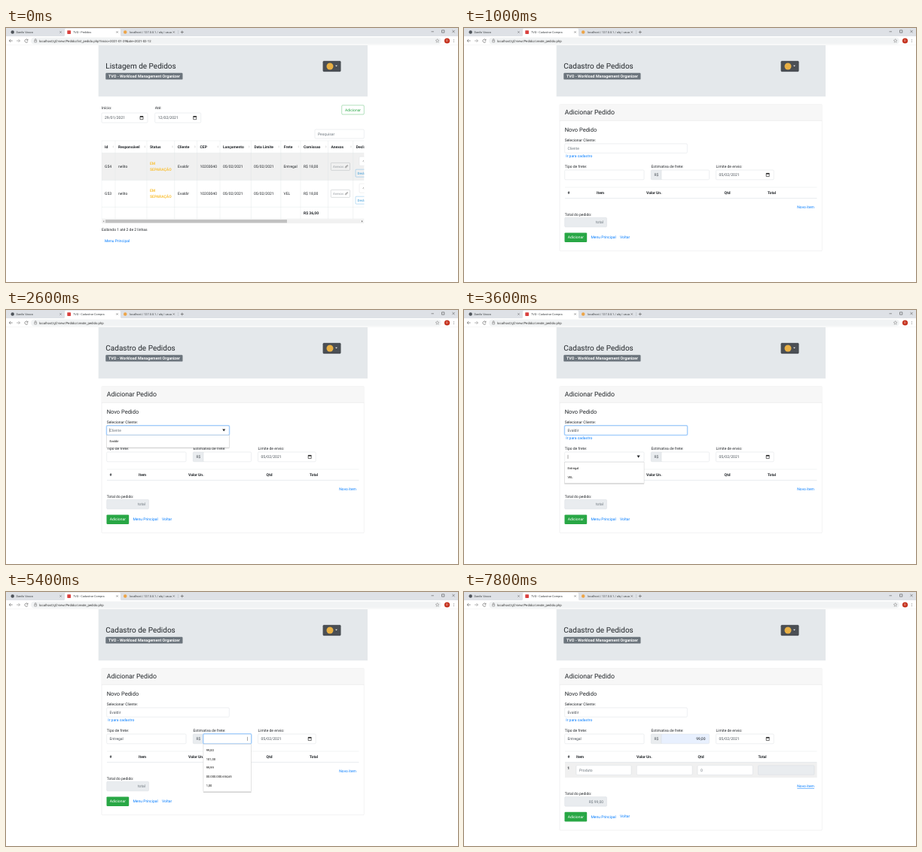
An HTML page that plays this animation: 600 px wide and 338 px high, repeating every 8 s.

```html
<!DOCTYPE html>
<html lang="pt-BR">
<head>
<meta charset="utf-8">
<title>Pedidos</title>
<style>
  html, body { margin: 0; width: 100%; height: 100%; overflow: hidden; background: #fff; }
  svg { display: block; width: 100%; height: 100%; font-family: Roboto, sans-serif; text-rendering: geometricPrecision; }
</style>
</head>
<body>
<svg id="stage" viewBox="0 0 600 338">
  <defs>
    <clipPath id="tableClip"><rect x="126.5" y="149" width="349" height="112"/></clipPath>
    <filter id="shadow" x="-10%" y="-10%" width="120%" height="130%">
      <feDropShadow dx="0" dy=".6" stdDeviation=".7" flood-opacity=".35"/>
    </filter>
  </defs>
  <g id="view"></g>
</svg>
<script>
const LOOP = 8000;
const INK = '#212529', GREY = '#6c757d', BLUE = '#007bff', GREEN = '#28a745', LINE = '#dee2e6', FIELD = '#ced4da', OFF = '#e9ecef';
const CUSTOMER = 'Evaldir', CARRIER = 'Entregal';

// y is the vertical middle of the text
const text = (x, y, label, { size = 5, fill = INK, weight = 400, anchor = 'start', extra = '' } = {}) =>
  `<text x="${x}" y="${y + size * .355}" font-size="${size}" fill="${fill}" font-weight="${weight}" text-anchor="${anchor}" ${extra}>${label}</text>`;
const bold = (x, y, label) => text(x, y, label, { weight: 700 });
const link = (x, y, label, options = {}) => text(x, y, label, { fill: BLUE, ...options });
const box = (x1, y1, x2, y2, fill, stroke = 'none', radius = 0, extra = '') =>
  `<rect x="${x1}" y="${y1}" width="${x2 - x1}" height="${y2 - y1}" rx="${radius}" fill="${fill}" stroke="${stroke}" stroke-width=".35" ${extra}/>`;
const path = (d, stroke, width = .4, fill = 'none') =>
  `<path d="${d}" stroke="${stroke}" stroke-width="${width}" fill="${fill}"/>`;
const circle = (x, y, r, fill) => `<circle cx="${x}" cy="${y}" r="${r}" fill="${fill}"/>`;
const arrow = (x, y, w, h, fill = INK) => path(`M${x - w} ${y - h}h${2 * w}l${-w} ${2 * h}z`, 'none', 0, fill);
const cross = (x, y, r) => path(`M${x - r} ${y - r}l${2 * r} ${2 * r}m0 ${-2 * r}l${-2 * r} ${2 * r}`, '#444', .5);

const input = (x1, y1, x2, y2, { fill = '#fff', focus = 0 } = {}) =>
  box(x1, y1, x2, y2, fill, FIELD, 1.2) + (focus > 0 ? `<g opacity="${focus.toFixed(2)}">` +
    `<rect x="${x1 - .5}" y="${y1 - .5}" width="${x2 - x1 + 1}" height="${y2 - y1 + 1}" rx="1.6" fill="none" stroke="#b5d8ff" stroke-width="1.1"/>` +
    box(x1, y1, x2, y2, 'none', '#4d9ff5', 1.2) + '</g>' : '');

const dateInput = (x1, y1, x2, y2, value) => {
  const y = (y1 + y2) / 2, x = x2 - 8;
  return input(x1, y1, x2, y2) + text(x1 + 4, y, value, { size: 5.1, fill: '#495057' }) +
    path(`M${x - 2} ${y - 2}h4v4.2h-4z`, '#111', .6) + box(x - 2, y - 2.2, x + 2, y - .9, '#111');
};

const dropdown = (x1, y1, x2, y2, items) =>
  box(x1, y1, x2, y2, '#fff', '#ccc', 0, 'filter="url(#shadow)"') +
  items.map((item, i) => text(x1 + 3.7, y1 + 8 + i * 11.7, item, { size: 4.1, fill: '#111' })).join('');

const caret = (x, y) => path(`M${x} ${y - 2.6}v5.2`, '#222', .4);

function browser(title, url) {
  const tab = { size: 3.85, fill: '#3c4043' };
  return box(0, 0, 600, 11, '#dee1e6') + path('M76.5 11q1.5 0 1.5-1.5V2.5Q78 .8 79.7 .8H150.3Q152 .8 152 2.5V9.5Q152 11 153.5 11z', 'none', 0, '#fff') +
    circle(8.7, 5.5, 2.2, '#50555b') + text(13.5, 5.5, 'Danilo Vasco', tab) + cross(72.5, 5.5, 1.1) +
    box(81.3, 3.2, 86, 7.9, '#d9413f', 'none', .6) + text(89, 5.5, title, tab) + cross(147.5, 5.5, 1.1) +
    circle(158.2, 5.5, 2.2, '#eda548') + text(164, 5.5, 'localhost / 127.0.0.1 / alq / usua', tab) + cross(222.7, 5.5, 1.1) +
    path('M228.5 3v5', '#9aa0a6', .3) + path('M231.8 5.5h4m-2-2v4', '#444', .55) +
    path('M564.5 4.8h3.4M578.5 2.9h3.3v3.3h-3.3z', '#222', .45) + cross(594, 4.6, 1.6) +
    box(0, 11, 600, 22.4, '#fff') + box(33, 12.5, 578, 21.5, '#f1f3f4', 'none', 4.5) +
    path('M8.7 17H4.2m2-2l-2 2 2 2', '#555', .6) + path('M14 17h4.5m-2-2l2 2-2 2', '#888', .6) +
    path('M28.8 16A2.1 2.1 0 1 0 29 17.8M29 14.7v1.6h-1.6', '#555', .6) +
    path('M37.8 16.4h2.8v2.5h-2.8zM38.3 16.4v-1a.9 .9 0 0 1 1.8 0v1', '#555', .45) +
    text(44, 17, url, { size: 4.3, fill: '#333' }) +
    path('M572.6 14.6l.7 1.6 1.7.1-1.3 1.2.4 1.7-1.5-.9-1.5.9.4-1.7-1.3-1.2 1.7-.1z', '#555', .35) +
    circle(585.5, 17, 3.6, '#c5321e') + text(585.5, 17, 'D', { size: 3.6, fill: '#fff', anchor: 'middle' }) +
    [15.3, 17, 18.7].map(y => circle(594.3, y, .45, '#555')).join('') + path('M0 22.5H600', '#e4e6e8', .3);
}

function banner(title) {
  return box(122.7, 23, 480, 91.2, '#e4e8eb') + text(132.3, 50.3, title, { size: 10, weight: 400 }) +
    box(132.3, 59.8, 234.5, 68.6, GREY, 'none', 1.2) +
    text(183.4, 64.1, 'TVO - Workload Management Organizer', { size: 5.3, fill: '#fff', weight: 700, anchor: 'middle' }) +
    box(420.8, 44, 444.3, 58, '#4b4f54', '#343a40', 1.2) + circle(430, 51, 4.5, '#e9b044') + arrow(438.5, 50.6, 1.5, .75, '#fff');
}

function orderRow(y, id, freight) {
  const cells = [[131, id], [149, 'nelito'], [228, CUSTOMER], [257.5, '10203040'], [288, '05/02/2021'], [329, '05/02/2021'], [368.5, freight], [395, 'R$ 18,00']];
  const status = { fill: '#f9c23c', weight: 700 };
  return cells.map(([x, label]) => text(x, y, label)).join('') +
    text(191, y - 4, 'EM', status) + text(191, y + 3.8, 'SEPARAÇÃO', status) +
    box(431.3, y - 4.8, 456.5, y + 5.2, 'none', '#999fa5', 1) + text(434, y + .2, 'Anexos', { size: 4.3, fill: '#969ca2' }) +
    path(`M450.5 ${y + 1}l2-2.3q1-.8 1.5 .2l-2.4 2.8q-1 .5-1.3-.4l2-2.4`, '#555', .45) +
    box(469, y - 13, 482, y - 1, '#fff', '#d5d8db', 1.2) + path(`M475 ${y - 8.2}l-1.2 1.2 1.2 1.2`, '#444', .4) +
    box(464, y + 4, 484, y + 14, 'none', '#4aa3df', 1) + text(466.5, y + 9, 'Declarar', { size: 4.4, fill: '#2a92d5' });
}

function listPage() {
  const columns = [[127, 'Id'], [145, 'Responsável'], [187, 'Status'], [223.7, 'Cliente'], [253.6, 'CEP'], [284, 'Lançamento'], [325.4, 'Data Limite'], [364.8, 'Frete'], [391, 'Comissao'], [427.5, 'Anexos'], [460.7, 'Declaração']];
  const header = columns.map(([x, label], i) => {
    const right = columns[i + 1]?.[0] - 2.7;
    return path(`M${x} 150V254`, LINE) + bold(x + 4, 158, label) +
      (right ? arrow(right, 159, .7, .5, '#bbb') + arrow(right, 157, .7, -.5, '#bbb') : '');
  }).join('');
  return banner('Listagem de Pedidos') + text(127, 106.5, 'Início:') + text(197.7, 106.5, 'Até:') +
    dateInput(127, 113, 188, 126, '29/01/2021') + dateInput(197.7, 113, 258.7, 126, '12/02/2021') +
    box(445.7, 102.8, 475.3, 115, '#fff', GREEN, 1.2) + text(460.5, 109, 'Adicionar', { fill: GREEN, anchor: 'middle' }) +
    input(410, 135, 475.3, 147) + text(414, 141, 'Pesquisar', { fill: GREY }) +
    '<g clip-path="url(#tableClip)">' + box(127, 166.3, 475.5, 202.5, '#f0f0f0') +
    path('M127 150H475.5M127 166.3H475.5M127 202.5H475.5M127 238.3H475.5M127 254H475.5', LINE) + header +
    orderRow(184.2, 'G54', CARRIER) + orderRow(220.2, 'G53', 'VEL') + bold(395, 246, 'R$ 36,00') +
    box(127, 254.3, 475.5, 260, '#f1f1f1') + box(132, 255, 373, 259.3, '#c1c1c1') +
    path('M130.2 256l-1.2 1.2 1.2 1.2z', 'none', 0, '#777') + path('M472.2 256l1.2 1.2-1.2 1.2z', 'none', 0, '#444') + '</g>' +
    text(127, 268.5, 'Exibindo 1 até 2 de 2 linhas') + link(131, 283.5, 'Menu Principal');
}

function itemTable(hasRow) {
  const xs = hasRow ? [137.5, 149, 229, 310.5, 390.5] : [137.5, 176, 242, 345.5, 403];
  const heads = ['#', 'Item', 'Valor Un.', 'Qtd', 'Total'].map((label, i) => bold(xs[i], 219.3, label)).join('');
  const row = box(134, 226.8, 468.5, 247, '#f0f0f0') + bold(137.3, 234.3, '1') +
    input(149, 230.8, 222, 243.3) + input(229.3, 230.8, 303, 243.3) + input(310, 230.8, 383.3, 243.3) +
    input(390.5, 230.8, 465, 243.3, { fill: OFF }) +
    text(153, 237, 'Produto', { fill: GREY }) + text(314, 237, '0', { fill: GREY });
  return path('M134 212H468.5', LINE) + heads + (hasRow ? row : '') + path('M134 226.6H468.5', LINE, .65);
}

function createPage(t) {
  const fade = at => Math.min(1, Math.max(0, (t - at) / 150));
  const focus = (start, end) => fade(start) - fade(end);
  const during = (start, end, markup) => t >= start && t < end ? markup : '';
  const hasRow = t >= 7400, priced = t >= 6000, shift = hasRow ? 20.4 : 0;
  const filled = { fill: '#495057' };

  return banner('Cadastro de Pedidos') +
    box(127, 101.6, 475.3, 296.7 + shift, '#fff', '#d9dadb', 1.2) + box(127.2, 101.8, 475.1, 123.3, '#f7f7f7') + path('M127 123.4H475.3', '#dfdfdf') +
    text(133.7, 111.6, 'Adicionar Pedido', { size: 8.75 }) + text(133.7, 135.7, 'Novo Pedido', { size: 7.5 }) +
    text(133.7, 149, 'Selecionar Cliente:') + input(133.7, 154, 296.3, 166.3, { focus: focus(2100, 3600) }) +
    (t < 3000 ? text(137.5, 160, 'Cliente', { fill: GREY }) : text(137.5, 160, CUSTOMER, filled)) +
    during(1600, 3000, arrow(289.2, 160, 2, 1.6)) + link(135.3, 170.2, 'Ir para cadastro') +
    text(133.7, 184, 'Tipo de frete:') + text(248.5, 184, 'Estimativa de frete:') + text(334.5, 184, 'Limite de envio:') +
    input(133.7, 189, 239, 201.8, { focus: focus(3620, 4850) }) +
    (t >= 4400 ? text(137.5, 195.4, CARRIER, filled) : '') +
    box(248.3, 189, 263, 201.8, OFF, FIELD, 1.2) + text(252.5, 195.4, 'R$', filled) +
    input(262, 189, 325.5, 201.8, { fill: priced ? '#e8f0fe' : '#fff', focus: focus(4850, 7100) }) +
    (priced ? text(320.5, 195.4, '99,00', { anchor: 'end' }) : '') +
    dateInput(334.5, 189, 411.2, 201.8, '05/02/2021') + itemTable(hasRow) +
    `<g transform="translate(0 ${shift})">` +
    link(465, 238.2, 'Novo item', { anchor: 'end', extra: t >= 7200 ? 'text-decoration="underline"' : '' }) +
    text(133.7, 248.3, 'Total do pedido:') + input(133.7, 252.2, 189.5, 264.8, { fill: OFF }) +
    text(185, 258.5, hasRow ? 'R$ 99,00' : 'total', { fill: GREY, anchor: 'end' }) +
    box(133.5, 272.4, 163.2, 285, GREEN, 'none', 1.2) + text(148.3, 278.7, 'Adicionar', { fill: '#fff', anchor: 'middle' }) +
    link(168.5, 278.5, 'Menu Principal') + link(207, 278.3, 'Voltar') + '</g>' +
    during(2200, 3000, caret(137.4, 160) + dropdown(133.7, 166.8, 296.3, 183, [CUSTOMER])) +
    during(3500, 4400, caret(138, 195.4) + arrow(231.6, 195.2, 2, 1.6) + dropdown(133.7, 202.5, 239, 230.5, [CARRIER, 'VEL'])) +
    during(5000, 6000, caret(320.5, 195.4) + dropdown(262, 202.5, 325.5, 265.8, ['99,00', '101,00', '99,99', '00.000.000.654,65', '1,00']));
}

function scene(t) {
  return t < 1000
    ? browser('TVO - Pedidos', 'localhost/gf/view/Pedido/list_pedido.php?inicio=2021-01-29&amp;ate=2021-02-12') + listPage()
    : browser('TVO - Cadastrar Compra', 'localhost/gf/view/Pedido/create_pedido.php') + createPage(t);
}

const view = document.getElementById('view');
const start = performance.now();
let shown = '';
function tick() {
  const markup = scene((performance.now() - start) % LOOP);
  if (markup !== shown) view.innerHTML = shown = markup;
  requestAnimationFrame(tick);
}
tick();
</script>
</body>
</html>
```
